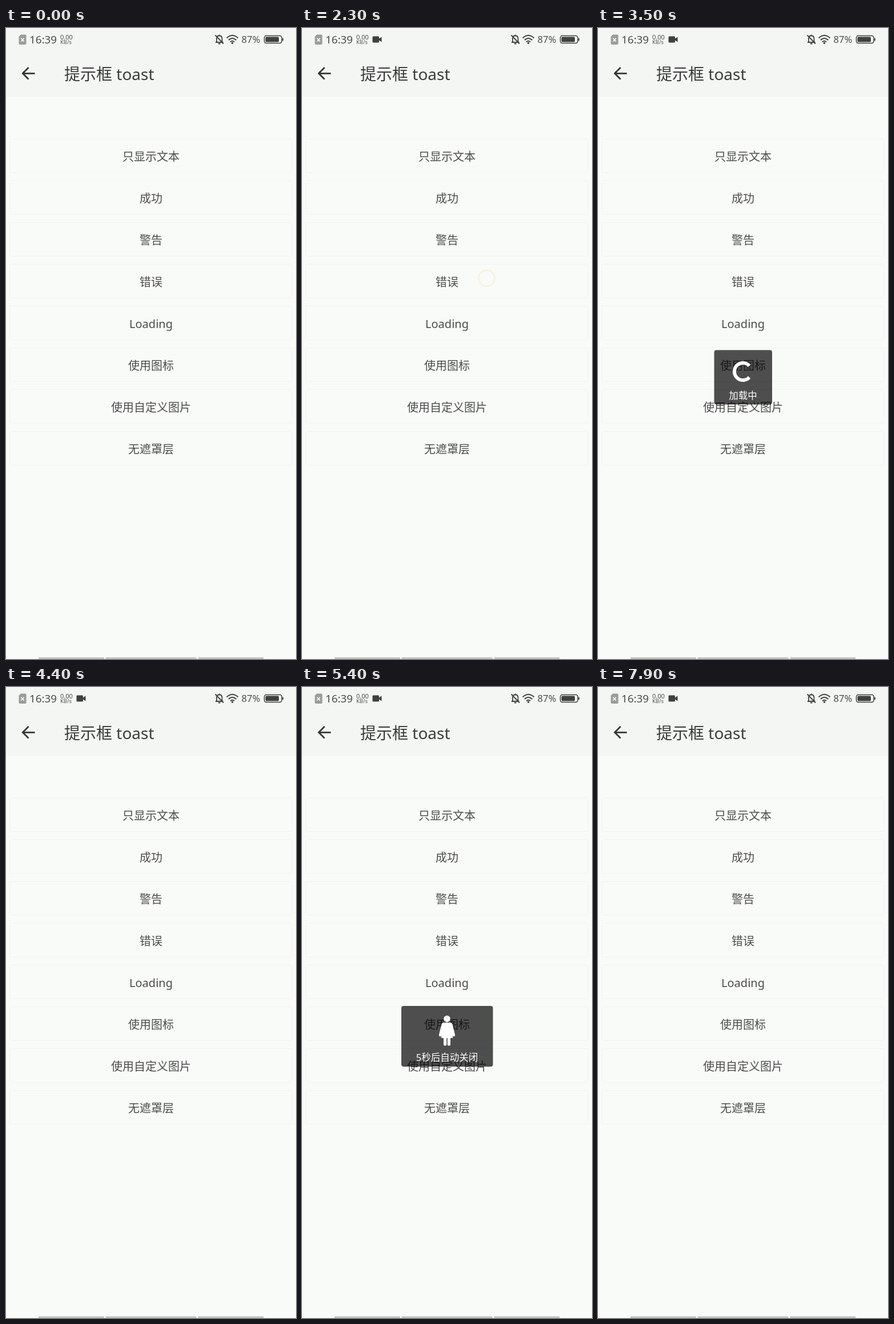
Recreate the animation shown at these times as an HTML page. Size 508 by 1102 pixels, loop 8000 ms.

```html
<!DOCTYPE html>
<html lang="zh-CN">
<head>
<meta charset="utf-8">
<title>提示框 toast</title>
<style>
html, body { margin: 0; width: 100%; height: 100%; overflow: hidden; background: #f9fbf9; }
svg { display: block; width: 100%; height: 100%; }
text { font-family: "Noto Sans", "Noto Sans CJK SC", "Noto Sans CJK", sans-serif; }
.mid text, .toast text { text-anchor: middle; }
.mid text { font-size: 20px; font-weight: 300; fill: #4b4d4b; }
.mid rect { fill: #f9fbf9; stroke: #f0f3f1; }
.line { fill: none; stroke: #fff; stroke-width: 3; stroke-linecap: round; stroke-linejoin: round; }
.toast > rect { fill: #000; fill-opacity: .69; }
.toast text { font-size: 16.5px; fill: #fff; }

/* one loop is 8 s, so 1.25% is 100 ms */
.toast, #tap, #cam { opacity: 0; animation: 8s step-end infinite; }
#cam { animation-name: cam; }
#tap { animation-name: tap; }
#plain { animation-name: plain; }
#ok { animation-name: ok; }
#warn { animation-name: warn; }
#fail { animation-name: fail; }
#load { animation-name: load; }
#icon { animation-name: icon; }
#pic { animation-name: pic; }
#free { animation-name: free; }
#spin { transform-origin: 254px 600px; animation: spin 1s steps(10) infinite; }

@keyframes cam { 0% { opacity: 0 } 1.25%, 100% { opacity: 1 } }
@keyframes plain { 0% { opacity: 0 } 5% { opacity: 1 } 11.25%, 100% { opacity: 0 } }
@keyframes ok { 0% { opacity: 0 } 15% { opacity: 1 } 20%, 100% { opacity: 0 } }
@keyframes warn { 0% { opacity: 0 } 23.75% { opacity: 1 } 28.75%, 100% { opacity: 0 } }
@keyframes fail { 0% { opacity: 0 } 32.5% { opacity: 1 } 37.5%, 100% { opacity: 0 } }
@keyframes load { 0% { opacity: 0 } 41.25% { opacity: 1 } 45%, 100% { opacity: 0 } }
@keyframes icon { 0% { opacity: 0 } 48.75% { opacity: 1 } 55%, 100% { opacity: 0 } }
@keyframes pic { 0% { opacity: 0 } 58.75% { opacity: 1 } 62.5%, 100% { opacity: 0 } }
@keyframes free { 0% { opacity: 0 } 66.25% { opacity: 1 } 95%, 100% { opacity: 0 } }
@keyframes spin { from { transform: rotate(-180deg) } to { transform: rotate(180deg) } }
@keyframes tap {
  0%, 5%, 12.5%, 21.25%, 31.25%, 40%, 46.25%, 58.75%, 63.75%, 100% { opacity: 0 }
  1.25% { opacity: 1; transform: translate(330px, 213px) }
  11.25% { opacity: 1; transform: translate(324px, 290px) }
  20% { opacity: 1; transform: translate(316px, 370px) }
  28.75% { opacity: 1; transform: translate(323.5px, 437px) }
  30% { opacity: .4; transform: translate(323.5px, 437px) }
  37.5% { opacity: 1; transform: translate(323px, 508px) }
  38.75% { opacity: .4; transform: translate(323px, 508px) }
  45% { opacity: 1; transform: translate(345px, 588px) }
  57.5% { opacity: 1; transform: translate(359px, 660px) }
  62.5% { opacity: 1; transform: translate(371px, 737px) }
}
</style>
</head>
<body>
<svg viewBox="0 0 508 1102" preserveAspectRatio="none">
  <defs>
    <g id="woman" fill="#fff">
      <circle cx="254" cy="579.5" r="5.7"/>
      <path d="M248.5 586H259.5Q262.5 586 263.5 589L268 607Q268.300 610 266 610.500Q264 610.500 263.300 608.500L260.500 598L264.500 613H243.500L247.500 598L244.700 608.500Q244 610.500 242 610.500Q239.700 610 240 607L244.500 589Q245.500 586 248.500 586Z"/>
      <path d="M248 612H253.200V624Q253.200 626.500 250.600 626.500Q248 626.500 248 624ZM254.800 612H260V624Q260 626.500 257.400 626.500Q254.800 626.500 254.800 624Z"/>
    </g>
  </defs>

  <rect width="508" height="1102" fill="#f9fbf9"/>
  <rect width="508" height="120" fill="#f4f6f4"/>

  <!-- status bar -->
  <path d="M26 11.500H33.500Q35.500 11.500 35.500 13.500V27Q35.500 29 33.500 29H24.500Q22.500 29 22.500 27V15Z" fill="#9b9d9b"/>
  <path d="M26.500 18L31.500 23.500M31.500 18L26.500 23.500" stroke="#fff" stroke-width="1.800"/>
  <g fill="#4b4d4b">
    <text x="41" y="27.300" font-size="18.800">16:39</text>
    <text x="95" y="19.500" font-size="11">0.00</text>
    <text x="95" y="28" font-size="9.400">KB/s</text>
    <text x="412.500" y="26" font-size="16.500">87%</text>
  </g>
  <g id="cam" fill="#3f413f">
    <rect x="123.500" y="14.500" width="11.500" height="11" rx="1.500"/>
    <path d="M135 18.500L139.500 15.500V24.500L135 21.500Z"/>
  </g>
  <g fill="none" stroke="#3f413f" stroke-width="1.800">
    <path d="M367 25H380.500M369 25V18.500Q369 13.500 373.700 13.500Q378.500 13.500 378.500 18.500V25M366.500 12.500L381 27.500M373.700 11.500V13.500M372 27.500H375.500"/>
    <path d="M386.500 17.500Q396.500 8.500 406.500 17.500M389.800 21Q396.500 15 403.200 21M393 24.300Q396.500 21.300 400 24.300" stroke-width="2"/>
    <rect x="452.500" y="13.500" width="30.500" height="13" rx="3.500" stroke-width="1.500"/>
  </g>
  <g fill="#3f413f">
    <circle cx="396.500" cy="26.300" r="1.700"/>
    <rect x="454.500" y="15.500" width="23.500" height="9" rx="2"/>
    <rect x="484" y="17.500" width="1.800" height="5" rx=".9"/>
  </g>

  <!-- title bar -->
  <path d="M50.500 79.300H29.500M39.500 69L29.300 79.300L39.500 89.600" fill="none" stroke="#353735" stroke-width="2.800"/>
  <text x="102" y="91.200" font-size="28" fill="#3a3c3a">提示框 toast</text>

  <g class="mid" id="list"></g>

  <path d="M57 1100.500H172M174.500 1100.500H333.500M336.500 1100.500H451" stroke="#c3c5c3" stroke-width="3"/>

  <g id="tap"><circle r="14" fill="none" stroke="#faf0d9" stroke-width="2.500"/></g>

  <g class="toast" id="plain">
    <rect x="178" y="591" width="152" height="37" rx="4"/>
    <text x="254" y="615.500">纯文本的提示</text>
  </g>
  <g class="toast" id="ok">
    <rect x="187" y="557" width="134" height="106" rx="4"/>
    <circle class="line" cx="254" cy="600" r="20.700"/>
    <path class="line" d="M244.500 601L251 607.500L264.500 593"/>
    <text x="254" y="653">成功的提示</text>
  </g>
  <g class="toast" id="warn">
    <rect x="187" y="557" width="134" height="106" rx="4"/>
    <circle class="line" cx="254" cy="600" r="20.700"/>
    <path class="line" d="M254 589V603M254 610V610.500"/>
    <text x="254" y="653">警告的提示</text>
  </g>
  <g class="toast" id="fail">
    <rect x="187" y="557" width="134" height="106" rx="4"/>
    <circle class="line" cx="254" cy="600" r="20.700"/>
    <path class="line" d="M247 593L261 607M261 593L247 607"/>
    <text x="254" y="653">错误的提示</text>
  </g>
  <g class="toast" id="load">
    <rect x="203.500" y="562.500" width="101.500" height="95" rx="4"/>
    <path id="spin" d="M265.100 590A15 15 0 1 0 265.100 610" fill="none" stroke="#fff" stroke-width="6"/>
    <text x="254" y="648">加载中</text>
  </g>
  <g class="toast" id="icon">
    <rect x="174" y="557" width="160.500" height="106" rx="4"/>
    <use href="#woman"/>
    <text x="254" y="653">5秒后自动关闭</text>
  </g>
  <g class="toast" id="pic">
    <rect x="174" y="550" width="160.500" height="121" rx="4"/>
    <circle cx="254" cy="600" r="28" fill="#fff"/>
    <text x="254" y="660">5秒后自动关闭</text>
  </g>
  <g class="toast" id="free">
    <rect x="174" y="557" width="160.500" height="106" rx="4"/>
    <use href="#woman"/>
    <text x="254" y="653">5秒后自动关闭</text>
  </g>
</svg>
<script>
const labels = ["只显示文本", "成功", "警告", "错误", "Loading", "使用图标", "使用自定义图片", "无遮罩层"];
document.getElementById("list").innerHTML = labels.map((label, i) => {
  const y = 193.5 + i * 73;
  return `<rect x="6.5" y="${y}" width="494" height="59" rx="3"/><text x="254" y="${y + 38}">${label}</text>`;
}).join("");
</script>
</body>
</html>
```
